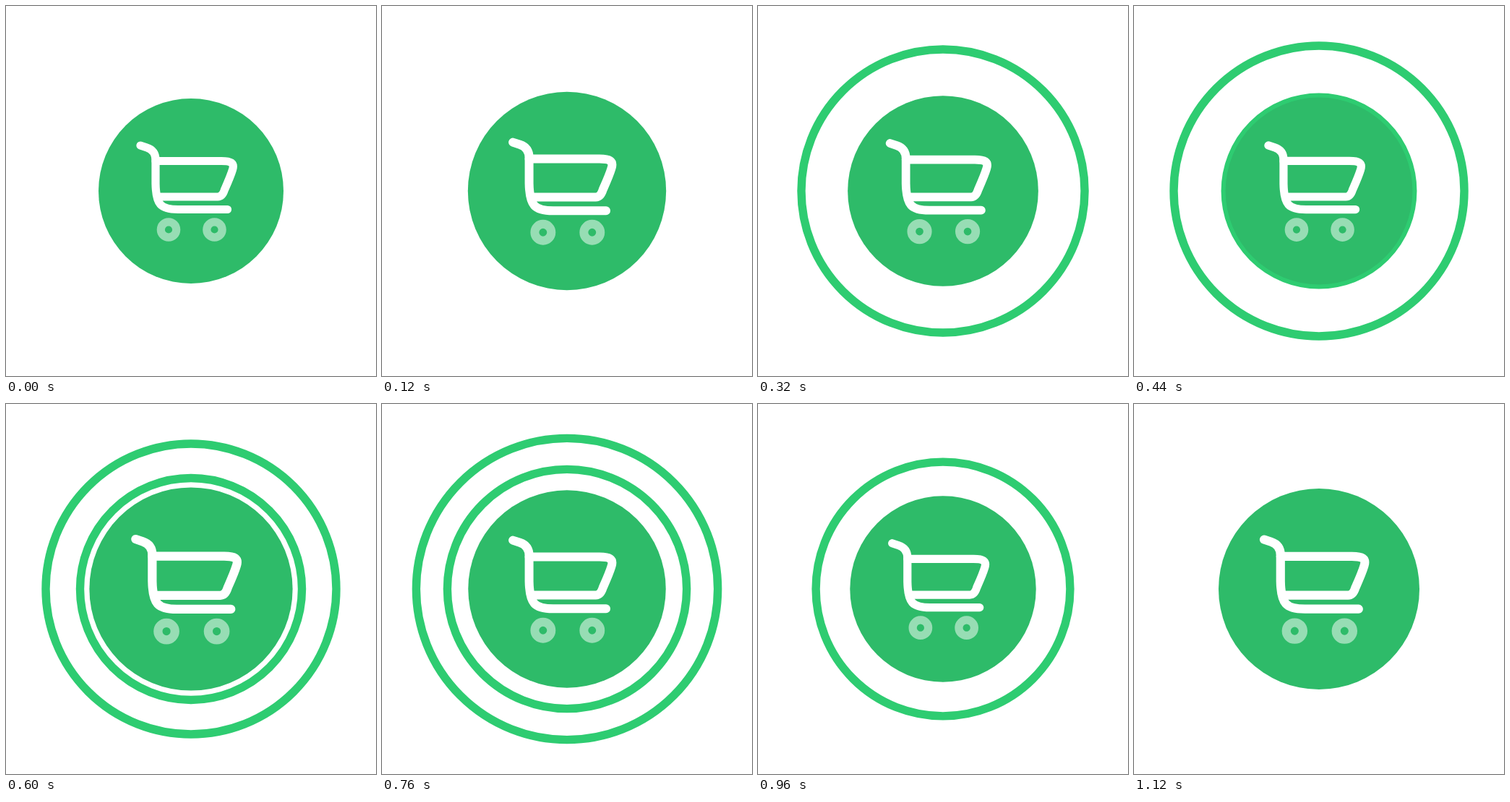
Recreate the animation shown at these times as an HTML page. Size 512 by 512 pixels, loop 1160 ms.

```html
<!DOCTYPE html>
<html lang="en">
<head>
<meta charset="utf-8">
<title>Cart pulse</title>
<style>
  html, body { margin: 0; width: 100%; height: 100%; overflow: hidden; background: #fff; }
  svg { display: block; width: 100%; height: 100%; }
  .ring { fill: none; stroke: #2ecc71; stroke-width: 11.4; }
  .disc { fill: #2ebb69; }
  .cart { fill: none; stroke: #fff; stroke-width: 11.2; stroke-linecap: round; stroke-linejoin: round; }
  .wheel { stroke-opacity: .5; }
</style>
</head>
<body>
<svg viewBox="0 0 512 512">
  <circle id="outer" class="ring" cx="256" cy="256"/>
  <circle id="inner" class="ring" cx="256" cy="256"/>
  <circle id="disc" class="disc" cx="256" cy="256"/>
  <g id="cart" class="cart">
    <path d="M186 193L195 196Q207 200 207 213V246C207.500 275 214 281.500 238 281.500H306.500"/>
    <path d="M207 214.500H298C311 214.500 316.500 217 313.500 226.500C311 235 306.500 245 302.500 254Q299.500 264 293 264H210"/>
    <circle class="wheel" cx="225" cy="309.500" r="10.700"/>
    <circle class="wheel" cx="288.500" cy="309.500" r="10.700"/>
  </g>
</svg>
<script>
const LOOP = 1160, STEP = 40;
const el = id => document.getElementById(id);
const clamp = x => Math.min(1, Math.max(0, x));

// Smooth interpolation between [time, value] keys
function tween(keys, t) {
  const i = keys.findIndex(k => k[0] > t);
  const [t0, a] = keys[i - 1], [t1, b] = keys[i];
  return a + (b - a) * (1 - Math.cos(Math.PI * (t - t0) / (t1 - t0))) / 2;
}

const discKeys = [[0, 128], [200, 142], [385, 128], [655, 142], [905, 128], [918, 128], [1209, 142]];
const cartKeys = [[0, 1], [200, 1.107], [425, 1], [650, 1.107], [925, 1], [1200, 1.107]];

const easeOut = x => 1 - (1 - x) ** 2.3;
const backIn = x => x * x * (2.6 * x - 1.6);

// Grow to full size, hold, swell a little and shrink away behind the disc
function ringRadius(t, full, start, grow, leave) {
  const opened = easeOut(clamp((t - start) / grow));
  const closed = backIn(clamp((t - leave) / 380));
  return Math.max(0, full * (opened - closed));
}

function setRing(id, r) {
  el(id).setAttribute("r", r);
  el(id).style.display = r > 0 ? "" : "none";
}

function draw(now) {
  const t = Math.floor(now % LOOP / STEP) * STEP;
  setRing("outer", ringRadius(t, 201, 0, 400, 690));
  setRing("inner", ringRadius(t, 153.5, 240, 360, 638));
  el("disc").setAttribute("r", tween(discKeys, t));
  el("cart").setAttribute("transform", `translate(256 256) scale(${tween(cartKeys, t)}) translate(-256 -256)`);
}

const begin = performance.now();
function tick() {
  draw(performance.now() - begin);
  requestAnimationFrame(tick);
}
tick();
</script>
</body>
</html>
```
